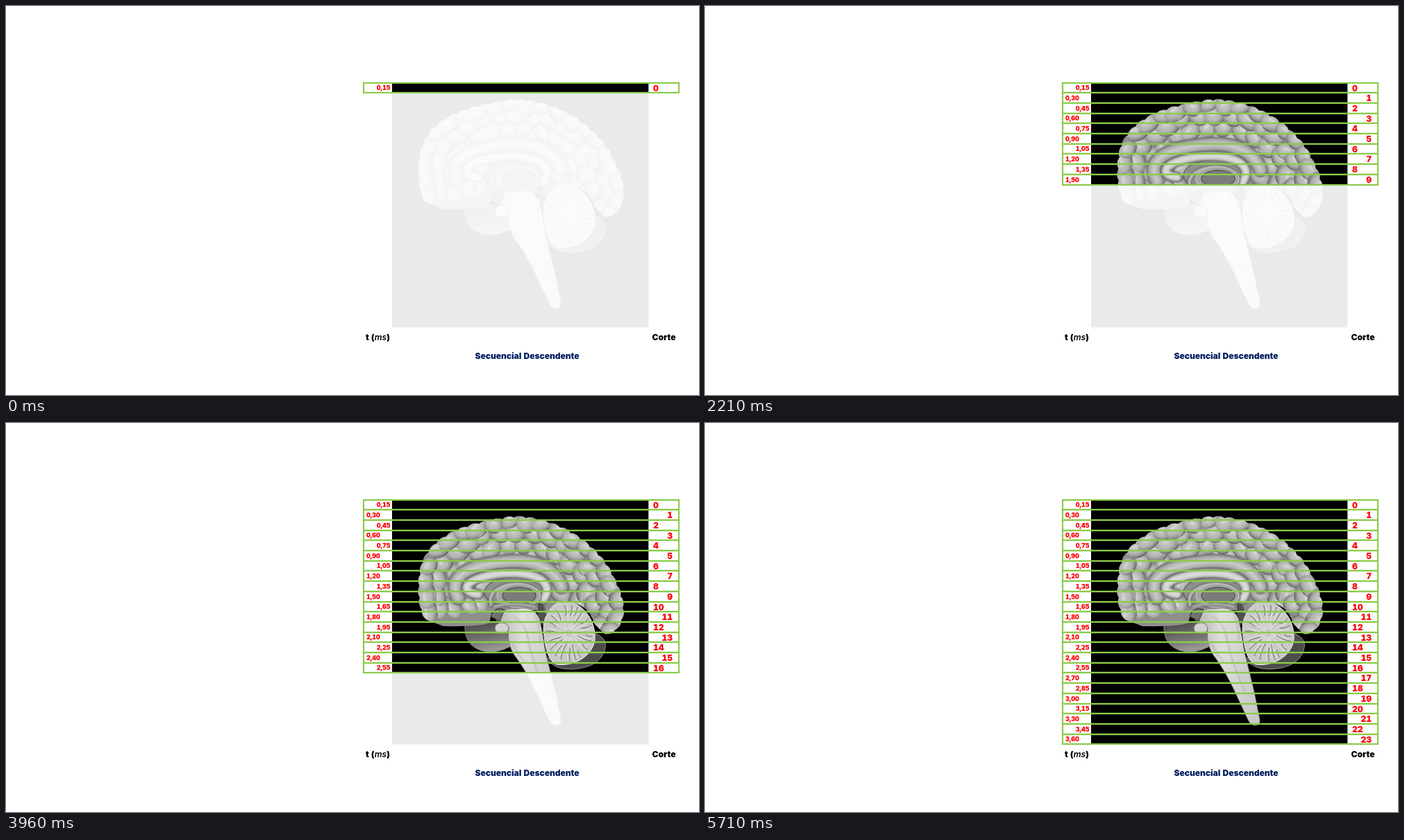
An HTML page that plays this animation: 998 px wide and 561 px high, repeating every 5960 ms.

```html
<!DOCTYPE html>
<html lang="es">
<head>
<meta charset="utf-8">
<title>Secuencial Descendente</title>
<style>
  html, body { margin: 0; width: 100%; height: 100%; overflow: hidden; background: #fff; }
  svg { display: block; width: 998px; height: 561px; }
  text { font: 900 12px Inter, "DejaVu Sans", sans-serif; font-variant-numeric: tabular-nums; }
  .time { font-size: 9px; }
  .label { fill: #f00; }
  .frame { fill: none; stroke: #8ccb4b; stroke-width: 2.2; }
</style>
</head>
<body>
<svg id="stage" viewBox="0 0 998 561">
  <defs>
    <radialGradient id="gyrus" cx=".45" cy=".4" r=".6">
      <stop offset="0" stop-color="#cbcbcb"/><stop offset=".55" stop-color="#b4b4b4"/>
      <stop offset=".85" stop-color="#8c8c8c"/><stop offset="1" stop-color="#5c5c5c"/>
    </radialGradient>
    <linearGradient id="stem">
      <stop offset="0" stop-color="#b4b4b4"/><stop offset=".4" stop-color="#dedede"/>
      <stop offset="1" stop-color="#c6c6c6"/>
    </linearGradient>
    <linearGradient id="temporal" x2=".3" y2="1">
      <stop offset="0" stop-color="#444"/><stop offset=".7" stop-color="#777"/>
      <stop offset="1" stop-color="#999"/>
    </linearGradient>
    <filter id="soft" x="-20%" y="-20%" width="140%" height="140%"><feGaussianBlur stdDeviation="1"/></filter>
    <clipPath id="cortexClip"><path id="cortexShape"/></clipPath>
    <clipPath id="scanned"><rect id="scanArea" x="556" y="110" width="369.5"/></clipPath>
    <g id="photo">
      <rect x="556" y="110.5" width="369.5" height="353"/>
      <path d="M661 288C660 306 664 321 684 328Q704 334 727 322L735 286Z" fill="url(#temporal)" stroke="#888"/>
      <path d="M778 340Q790 356 815 355Q854 353 862 328Q868 312 850 304Z" fill="#4c4c4c" stroke="#909090"/>
      <g clip-path="url(#cortexClip)">
        <rect x="585" y="125" width="315" height="185" fill="#8e8e8e"/>
        <g id="cortex"></g>
        <g id="shine" fill="none" stroke="#f2f2f2" stroke-width="1.6" opacity=".7" filter="url(#soft)"></g>
      </g>
      <g id="core" fill="none" stroke-linecap="round"></g>
      <path d="M706 277Q717 266 736 268Q760 263 768 282C773 300 774 317 778 335Q785 363 791 388L799 428Q800 436 792 436Q786 436 782 428L761 383Q749 358 736 340C725 327 722 311 724 296Q719 284 706 285Z" fill="url(#stem)" stroke="#777" stroke-width=".8"/>
      <path d="M730 279Q748 287 752 312T777 388M761 274Q770 294 769 315M729 317Q739 337 748 345" fill="none" stroke="#999" filter="url(#soft)"/>
      <path d="M698 279Q704 263 718 269L711 286Z" fill="#707070" stroke="#333"/>
      <ellipse cx="714" cy="296" rx="10" ry="8" fill="#d2d2d2" stroke="#777"/>
      <path d="M806 257C830 258 850 285 848 312C845 338 815 352 792 348C778 340 776 318 774 298C774 275 788 257 806 257Z" fill="#c9c9c9" stroke="#eee"/>
      <g id="cerebellum" fill="none" stroke-linecap="round"></g>
    </g>
  </defs>
  <use href="#photo" opacity=".08"/>
  <use href="#photo" clip-path="url(#scanned)"/>
  <g id="rows"></g>
  <text x="518" y="481.5">t (<tspan font-style="italic" font-weight="600">ms</tspan>)</text>
  <text x="947.5" y="481.5" text-anchor="middle">Corte</text>
  <text x="750.5" y="509" text-anchor="middle" fill="#002060">Secuencial Descendente</text>
</svg>
<script>
const LOOP = 5960, FIRST = 210, STEP = 250, ROWS = 24, TOP = 110.5, PITCH = 14.7;
const byId = id => document.getElementById(id);
const lineY = i => Math.round(TOP + i * PITCH);

function create(tag, attrs) {
  const node = document.createElementNS('http://www.w3.org/2000/svg', tag);
  for (const key in attrs) node.setAttribute(key, attrs[key]);
  return node;
}
const add = (parent, tag, attrs) => parent.appendChild(create(tag, attrs));

let seed = 7;
function jitter(range) {
  seed = (seed * 16807) % 2147483647;
  return (seed / 2147483647 * 2 - 1) * range;
}

// Upper edge of the cortex, clockwise from the lower left
const crown = create('path', {
  d: 'M606 284C593 268 593 225 601 200C616 167 651 146 735 136C799 140 840 172 864 205C882 236 893 262 886 284Q880 303 862 304'
});
const crownLength = crown.getTotalLength();
const underside = 'L848 290Q838 258 803 257Q784 262 774 282L765 270L700 272L696 288Q684 294 630 293Z';

function drawOutline(bumps) {
  let d = '', last;
  for (let i = 0; i <= bumps; i++) {
    const { x, y } = crown.getPointAtLength(crownLength * i / bumps);
    const radius = last && Math.hypot(x - last.x, y - last.y) * .95;
    d += last ? `A${radius} ${radius} 0 0 1 ${x} ${y}` : `M${x} ${y}`;
    last = { x, y };
  }
  byId('cortexShape').setAttribute('d', d + underside);
}

// One ring of folds: the crown shrunk towards the middle of the brain
function drawRing(scale) {
  const count = Math.round(crownLength * scale / 23);
  for (let i = 0; i < count; i++) {
    const at = crownLength * (i + .5) / count;
    const p = crown.getPointAtLength(at), q = crown.getPointAtLength(at + 1);
    const x = 745 + (p.x - 745) * scale + jitter(3), y = 255 + (p.y - 255) * scale + jitter(3);
    const turn = Math.atan2(q.y - p.y, q.x - p.x) * 180 / Math.PI + jitter(40);
    const rx = 16 + jitter(3), ry = 12 + jitter(2);
    const transform = `translate(${x} ${y}) rotate(${turn})`;
    add(byId('cortex'), 'ellipse', { rx, ry, transform, fill: 'url(#gyrus)' });
    add(byId('shine'), 'path', { d: `M${-rx * .4} -3Q0 -6 ${rx * .3} -3`, transform });
  }
}

function tube(d, ...layers) {
  for (const [width, stroke] of layers) {
    add(byId('core'), 'path', { d, stroke, 'stroke-width': width, filter: 'url(#soft)' });
  }
}

function drawCore() {
  const oval = (cx, cy, rx, ry, fill, stroke) => add(byId('core'), 'ellipse', { cx, cy, rx, ry, fill, stroke, 'stroke-width': 1.5 });
  tube('M651 252C634 220 669 206 712 201C752 195 787 204 800 236', [22, '#666'], [18, '#a0a0a0'], [12, '#b8b8b8'], [4, '#cbcbcb']);
  tube('M768 263L775 286', [13, '#505050']);
  oval(735, 244, 46, 22, '#8e8e8e', '#666');
  tube('M680 247C656 244 658 230 687 222C718 213 756 215 772 227Q785 239 774 254', [15, '#555'], [12, '#c0c0c0'], [6, '#dadada']);
  tube('M699 263C692 245 711 232 737 232Q764 233 768 253', [6, '#555'], [3.5, '#cacaca']);
  oval(738, 249, 31, 17, '#a4a4a4', '#bdbdbd');
  oval(739, 249, 24, 12, '#7b7b7b', '#575757');
  tube('M703 265Q728 257 762 265', [6, '#666'], [3, '#bbb']);
}

function drawCerebellum(count) {
  const group = byId('cerebellum');
  for (let i = 0; i < count; i++) {
    const angle = i / count * 2 * Math.PI + jitter(.08);
    const at = (reach, shift) => `${811 + 36 * reach * Math.cos(angle + shift)} ${303 + 44 * reach * Math.sin(angle + shift)}`;
    const start = .5 + jitter(.18);
    add(group, 'path', { d: `M${at(start, 0)}Q${at(.7, .12)} ${at(.92, .04)}`, stroke: '#666' });
    add(group, 'path', { d: `M${at(.15, .1)}L${at(.85, .16)}`, stroke: '#e2e2e2', 'stroke-width': 1.2 });
  }
}

function makeRow(_, i) {
  const row = add(byId('rows'), 'g', {});
  const y = lineY(i), height = lineY(i + 1) - y, middle = TOP + (i + .5) * PITCH, odd = i % 2;
  const label = (kind, x, dy, anchor, text) => {
    add(row, 'text', { class: `label ${kind}`, x, y: middle + dy, 'text-anchor': anchor }).textContent = text;
  };
  add(row, 'rect', { class: 'frame', x: 515, y, width: 454, height });
  label('time', odd ? 519 : 553.5, 3.4, odd ? 'start' : 'end', ((i + 1) * .15).toFixed(2).replace('.', ','));
  label('slice', odd ? 960 : 932, 4.7, odd ? 'end' : 'start', i);
  return row;
}

drawOutline(30);
[.4, .54, .68, .82, .95].forEach(drawRing);
drawCore();
drawCerebellum(20);
const rows = Array.from({ length: ROWS }, makeRow);

function render(ms) {
  const count = Math.min(ROWS, Math.max(1, 2 + Math.floor((ms - FIRST) / STEP)));
  byId('scanArea').setAttribute('height', lineY(count) - 110);
  rows.forEach((row, i) => row.setAttribute('visibility', i < count ? 'visible' : 'hidden'));
}

const began = performance.now();
function tick() {
  render((performance.now() - began) % LOOP);
  requestAnimationFrame(tick);
}
tick();
</script>
</body>
</html>
```
